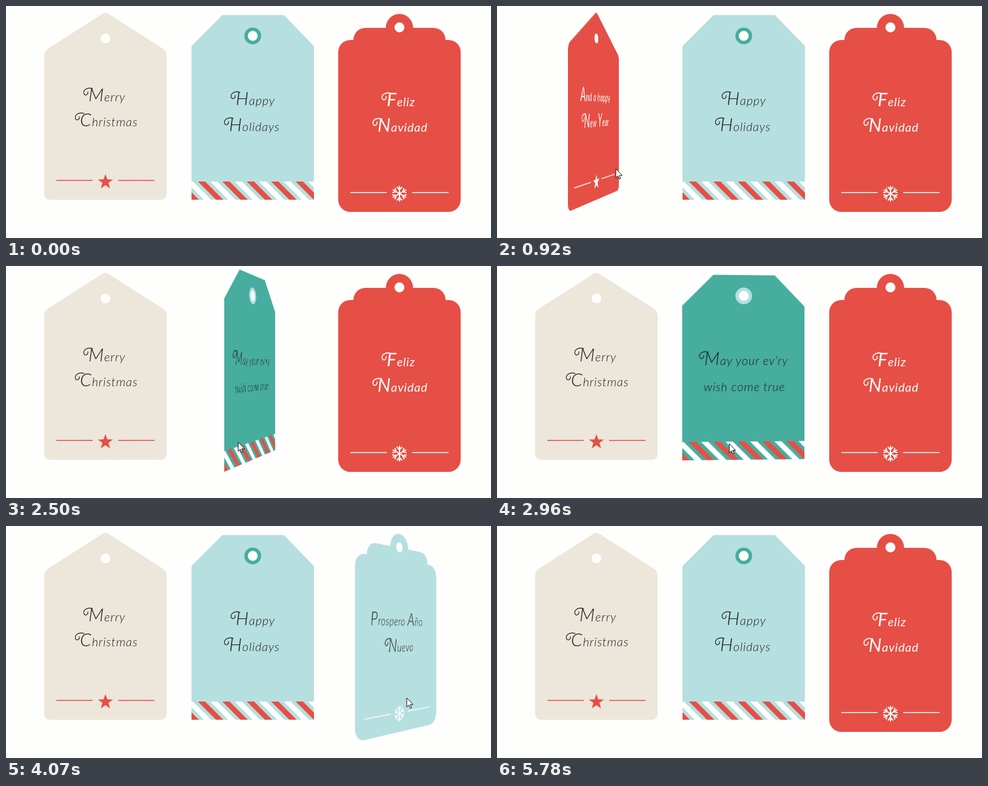
Write an HTML page that moves like this. It is 800 px wide and 382 px high and loops after 5960 ms.

```html
<!DOCTYPE html>
<html lang="en">
<head>
<meta charset="utf-8">
<title>Gift tags</title>
<style>
  html, body { margin: 0; width: 100%; height: 100%; overflow: hidden; background: #fefefd; }
  #stage { position: fixed; inset: 0; overflow: hidden; contain: strict; }
  svg { position: absolute; top: 0; left: 0; display: block; overflow: hidden; }
  text { font: italic 300 20px Lato, sans-serif; letter-spacing: .8px; }
  .cap { font-size: 30px; }
  .bold text { font-weight: 400; }
</style>
</head>
<body>
<div id="stage"></div>
<script>
const LOOP = 5960, TURN = 1000, DEPTH = 800, HALF = 105, TALL = 345;
const RED = '#e64f45', CREAM = '#ede6da', SKY = '#b6dfdf', TEAL = '#46ad9f',
      INK = '#1c1c1c', WHITE = '#fefefd';

// All tag drawings use x = 0 as the vertical middle of the tag.
const path = (d, fill) => `<path d="${d}" fill="${fill}"/>`;
const dot = (y, r, fill) => `<circle cy="${y}" r="${r}" fill="${fill}"/>`;

function rules(y, color) {
  return `<path d="M-81 ${y}h60M21 ${y}h60" stroke="${color}" stroke-width="1.6"/>`;
}

// Each line: text, left, baseline and whether the first capital has a swash.
function words(color, lines, bold) {
  const body = lines.map(([str, x, y, swash]) => {
    const spans = str.replace(/[A-Z]/g, '<tspan class="cap">$&</tspan>');
    const curl = `<path d="M7-21C-3-24-9-18-7.5-13S0-11-1-16" fill="none" stroke="${color}"
      stroke-width="${bold ? 1.6 : 1.1}" stroke-linecap="round"/>`;
    return `<g transform="translate(${x} ${y})"><text fill="${color}">${spans}</text>${swash ? curl : ''}</g>`;
  });
  return `<g class="${bold ? 'bold' : ''}">${body.join('')}</g>`;
}

function star(cy, r, fill) {
  const pts = Array.from({ length: 10 }, (_, i) => {
    const a = i * Math.PI / 5, k = i % 2 ? r * 0.4 : r;
    return `${(k * Math.sin(a)).toFixed(2)},${(cy - k * Math.cos(a)).toFixed(2)}`;
  });
  return `<polygon points="${pts.join(' ')}" fill="${fill}"/>`;
}

function snowflake(cy) {
  let arms = '';
  for (let a = 0; a < 360; a += 60)
    arms += `<path transform="rotate(${a})" d="M0 0V-12M-3.8-10.500L0-6.500 3.800-10.500"/>`;
  return `<g transform="translate(0 ${cy})" fill="none" stroke="${WHITE}" stroke-width="2" stroke-linecap="round">${arms}</g>`;
}

function stripes(id) {
  let bars = '';
  for (let i = -2; i < 6; i++)
    for (const [shift, fill] of [[0, RED], [20.2, WHITE]])
      bars += path(`M${-90.5 + i * 40.3 + shift} 289h12l30 30h-12z`, fill);
  return `<clipPath id="${id}"><rect x="-101" y="289" width="202" height="30"/></clipPath>
    <g clip-path="url(#${id})">${bars}</g>`;
}

function houseTag(paper, accent, text) {
  return path(`M-101 82Q-101 74-94.5 70L-5 13Q0 9.5 5 13L94.5 70Q101 74 101 82
    V310a9 9 0 0 1-9 9H-92a9 9 0 0 1-9-9z`, paper) +
    dot(53.5, 8, WHITE) + text + rules(287.2, accent) + star(289.7, 13, accent);
}

function cutTag(paper, ring, text, id) {
  return path('M-101 66L-50 15H51.5L101 66V319H-101z', paper) +
    dot(49.3, 13.8, ring) + dot(49.3, 8.2, WHITE) + text + stripes(id);
}

function tabTag(paper, text) {
  return path(`M-101 76a20 20 0 0 1 20-20H-76a20 20 0 0 1 20-20H-22.5a22.5 23 0 0 1 45 0H56
    a20 20 0 0 1 20 20H81a20 20 0 0 1 20 20V319a20 20 0 0 1-20 20H-81a20 20 0 0 1-20-20z`, paper) +
    dot(35.3, 8.2, WHITE) + text + rules(307.3, WHITE) + snowflake(309);
}

// enter / leave: when the pointer starts each half turn.
const tags = [
  { cx: 163.5, cy: 165, enter: 553, leave: 1528,
    front: houseTag(CREAM, RED, words(INK, [['Merry', -28, 157, true], ['Christmas', -42, 198, true]])),
    back: houseTag(RED, WHITE, words(WHITE, [['And a happy', -60, 157], ['New Year', -47, 199, true]], true)) },
  { cx: 406.5, cy: 167, enter: 2133, leave: 3105,
    front: cutTag(SKY, TEAL, words(INK, [['Happy', -28, 163, true], ['Holidays', -39, 206, true]]), 'bandA'),
    back: cutTag(TEAL, SKY, words(INK, [['May your ev’ry', -65, 163, true], ['wish come true', -66, 206]]), 'bandB') },
  { cx: 649.3, cy: 176, enter: 3637, leave: 4780,
    front: tabTag(RED, words(WHITE, [['Feliz', -21, 165, true], ['Navidad', -36, 207, true]], true)),
    back: tabTag(SKY, words(INK, [['Prospero Año', -68, 164], ['Nuevo', -27, 207, true]])) },
];

// Pointer stops: time, x, y. Below y = 382 it is off stage.
const stops = [
  [0, 188, 400], [430, 188, 400], [553, 193, 318], [720, 196, 268], [1380, 196, 268],
  [1500, 200, 340], [1600, 215, 400], [1980, 372, 400], [2133, 380, 318], [2300, 383, 290],
  [2950, 383, 290], [3105, 385, 325], [3300, 388, 355], [3400, 400, 400], [3500, 640, 400],
  [3633, 655, 338], [3800, 661, 283], [4620, 661, 283], [4780, 663, 341], [4880, 665, 400], [LOOP, 665, 400],
];

const stage = document.getElementById('stage');
function add(html) {
  stage.insertAdjacentHTML('beforeend', html);
  return stage.lastElementChild;
}

for (const tag of tags) {
  tag.el = add(`<svg viewBox="${-HALF} 0 ${2 * HALF} ${TALL}" width="${2 * HALF}" height="${TALL}"
    style="left:${tag.cx - HALF}px;transform-origin:${HALF}px ${tag.cy}px"><g>${tag.front}</g><g>${tag.back}</g></svg>`);
  [tag.frontEl, tag.backEl] = tag.el.children;
}
const pointer = add(`<svg width="800" height="382"><path d="M0 0V15L3.4 11.8 5.8 17 8 16 5.7 11H10.5z"
  fill="#fff" stroke="#111" stroke-linejoin="round"/></svg>`).firstElementChild;

// The CSS "ease" curve, cubic-bezier(.25, .1, .25, 1).
function ease(x) {
  if (x <= 0) return 0;
  if (x >= 1) return 1;
  let lo = 0, hi = 1, s;
  for (let i = 0; i < 24; i++) {
    s = (lo + hi) / 2;
    if (0.75 * s * (1 - s) + s ** 3 < x) lo = s; else hi = s;
  }
  return 0.3 * s * (1 - s) ** 2 + 3 * s * s * (1 - s) + s ** 3;
}

function turn(tag, t) {
  const angle = 180 * (ease((t - tag.enter) / TURN) + ease((t - tag.leave) / TURN));
  const back = angle > 90 && angle < 270;
  tag.frontEl.style.display = back ? 'none' : '';
  tag.backEl.style.display = back ? '' : 'none';
  tag.el.style.transform = angle % 360
    ? `perspective(${DEPTH}px) rotateY(${(back ? 180 : 0) - angle}deg)` : 'none';
}

function movePointer(t) {
  const i = stops.findIndex(s => s[0] > t);
  const [t0, x0, y0] = stops[i - 1], [t1, x1, y1] = stops[i];
  const k = (t - t0) / (t1 - t0);
  pointer.setAttribute('transform', `translate(${x0 + (x1 - x0) * k} ${y0 + (y1 - y0) * k})`);
}

function render(t) {
  for (const tag of tags) turn(tag, t);
  movePointer(t);
}

const start = performance.now();
function tick() {
  render((performance.now() - start) % LOOP);
  requestAnimationFrame(tick);
}
tick();
</script>
</body>
</html>
```
